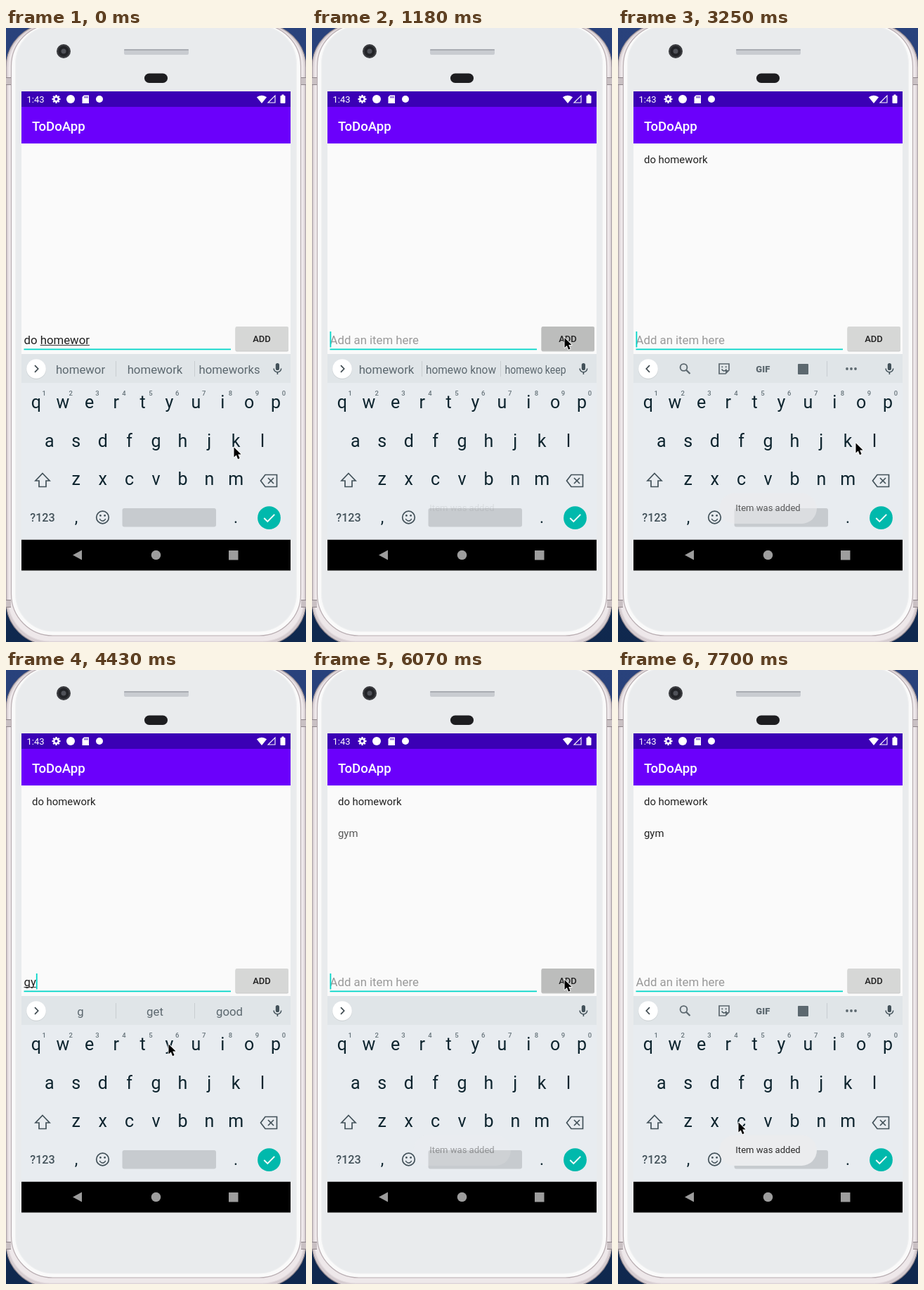
An HTML page with a canvas that plays this animation: 427x872 px, repeating every 8000 ms.

```html
<!DOCTYPE html>
<html lang="en">
<head>
<meta charset="utf-8">
<title>To-do list on a phone</title>
<style>
html, body { margin: 0; width: 100%; height: 100%; overflow: hidden; background: #0e1c3c; }
canvas { display: block; width: 427px; height: 872px; }
</style>
</head>
<body>
<canvas id="stage"></canvas>
<script>
const W = 427, H = 872, MID = 213.5, LOOP = 8000;
const STEP = 147.5, LAST = 52; // screen refresh in ms, last refresh of the loop
const canvas = document.getElementById('stage');
const c = canvas.getContext('2d');
const dpr = window.devicePixelRatio || 1;
canvas.width = W * dpr;
canvas.height = H * dpr;

const TEAL = '#00d5c8', GREY = '#5c686f', DARK = '#43525a', INK = '#0d242e';
const PURPLE = '#3b00b5', NAV = '#9d9d9d';

// Places the pointer visits
const STOPS = [
  { at: 0, hold: 2, x: 324, y: 595 },
  { at: 4, hold: 1, x: 348, y: 429 },
  { at: 7, hold: 2, x: 359, y: 439.5 },
  { at: 13, hold: 3, x: 246, y: 585 },
  { at: 20, hold: 3, x: 338, y: 589 },
  { at: 27, hold: 1, x: 212, y: 587 },
  { at: 29.5, hold: 2, x: 231, y: 531 },
  { at: 35, hold: 1, x: 324, y: 641 },
  { at: 39, hold: 3, x: 359, y: 439.5 },
  { at: 51, hold: 2, x: 171, y: 642 }
];
// What the field holds from a given moment, with the words offered for it
const EDITS = [
  { at: -4, typed: 'do homewor', hints: ['homewor', 'homework', 'homeworks'] },
  { at: 2, typed: 'do homework', hints: ['homework', 'homewo know', 'homewo keep'] },
  { at: 7.9, typed: '', hints: [] },
  { at: 28, typed: 'g', hints: ['g', 'get', 'good'] },
  { at: 30, typed: 'gy', hints: ['gy', 'gym', 'guy'] },
  { at: 36, typed: 'gym', hints: ['gym', 'gyms', 'gymnastics'] },
  { at: 40.5, typed: '', hints: [] }
];
// Clearing the field means its text was added to the list
const ADDS = EDITS
  .map((e, i) => ({ ...e, item: i ? EDITS[i - 1].typed : '' }))
  .filter(e => !e.typed);

const latest = n => EDITS.filter(e => e.at <= n).pop();
const clamp = v => Math.max(0, Math.min(1, v));
const smooth = k => k * k * (3 - 2 * k);

function box(x, y, w, h, color, r = 0) {
  c.beginPath();
  c.roundRect(x, y, w, h, r);
  c.fillStyle = color;
  c.fill();
}

function line(color, width) {
  c.strokeStyle = color;
  c.lineWidth = width;
  c.stroke();
}

function arc(x, y, r, from = 0, to = Math.PI * 2) {
  c.beginPath();
  c.arc(x, y, r, from, to);
}

function disc(x, y, r, color) {
  arc(x, y, r);
  c.fillStyle = color;
  c.fill();
}

function smile(x, y, r) {
  arc(x, y, r, 0.3, Math.PI - 0.3);
  line(DARK, 1.5);
}

function poly(points, closed = true) {
  c.beginPath();
  for (let i = 0; i < points.length; i += 2) c.lineTo(points[i], points[i + 1]);
  if (closed) c.closePath();
}

function shape(points, color) {
  poly(points);
  c.fillStyle = color;
  c.fill();
}

function text(s, x, y, size, color, { weight = 400, align = 'left', max } = {}) {
  c.font = `${weight} ${size}px Roboto, sans-serif`;
  c.textAlign = align;
  c.fillStyle = color;
  c.fillText(s, x, y, max);
}

function shell(x, top, bottom, r, fill, edge) {
  box(x, top, W - 2 * x, bottom - top, fill, r);
  line(edge, 1.2);
}

function drawPhone() {
  const night = c.createLinearGradient(0, 0, 0, H);
  night.addColorStop(0, '#29427c');
  night.addColorStop(1, '#0f284e');
  box(0, 0, W, H, night);

  shell(0, -6, 876, 62, '#d5ccd0', '#958b90');
  shell(3, -4, 871, 60, '#eee8ea', '#e4dcdf');
  shell(7.5, -5, 863, 59, '#fafafa', '#b9aeb2');
  shell(13.5, -3, 857, 54, '#e9ebed', '#eff0f1');
  for (const x of [0, 420]) {
    for (const y of [70, 812]) {
      box(x, y, 7, 11, '#8f868a');
      box(x, y + 1, 7, 9, '#c9c0c3');
    }
  }

  disc(82, 33, 10, '#3a3b3f');
  disc(82, 33, 7.5, '#222327');
  disc(82, 33, 3.5, '#505259');
  box(168, 30, 92, 8, '#c9ccd1', 2);
  box(168, 30, 92, 2, '#a9acb2', 1);
  box(197, 64.5, 33, 13.5, '#1d1d20', 6.75);
}

function drawStatus() {
  text('1:43', 29.5, 106, 13, '#fff');
  for (let a = 0; a < Math.PI; a += Math.PI / 4) {
    const dx = 6 * Math.cos(a), dy = 6 * Math.sin(a);
    poly([71.5 - dx, 101 - dy, 71.5 + dx, 101 + dy], false);
    line('#fff', 2.4);
  }
  disc(71.5, 101, 4.4, '#fff');
  disc(71.5, 101, 2, PURPLE);
  disc(92, 101, 6, '#fff');
  shape([111, 95.5, 118, 95.5, 118, 107, 108.5, 107, 108.5, 98], '#fff');
  for (const x of [111.5, 113.5, 115.5]) box(x, 97, 1, 2.5, PURPLE);
  disc(133, 101, 5, '#fff');

  arc(364, 107, 11.2, -Math.PI * 0.72, -Math.PI * 0.28);
  c.lineTo(364, 107);
  c.fillStyle = '#fff';
  c.fill();
  poly([383, 96, 383, 106, 373, 106]);
  line('#fff', 1.1);
  box(390.5, 96, 7, 11, '#fff', 1);
  box(392.5, 94.5, 3, 2, '#fff');
}

function drawBars() {
  box(22, 90, 383, 680.5, '#fafafa');
  box(22, 90, 383, 22, PURPLE);
  box(22, 112, 383, 52, '#6b00fb');
  text('ToDoApp', 37, 145.5, 18.64, '#fff', { weight: 500 });
  drawStatus();

  box(22, 726.5, 383, 44, '#000');
  shape([95, 748.5, 108, 741.5, 108, 755.5], NAV);
  disc(MID, 748.5, 6.8, NAV);
  box(317, 742, 13.5, 13.5, NAV);
}

function drawList(n) {
  ADDS.forEach(({ at, item }, i) => {
    c.globalAlpha = clamp((n - at - 0.2) / 0.4);
    text(item, 37, 192 + i * 44.7, 14.9, '#212121');
  });
  c.globalAlpha = 1;
}

function drawInput(n) {
  const { at, typed } = latest(n), x = 25.5;
  text(typed || 'Add an item here', x, 448.5, 16.78, typed ? '#212121' : '#999');
  const edge = s => x + c.measureText(s).width;
  const end = edge(typed), word = edge(typed.slice(0, typed.lastIndexOf(' ') + 1));
  box(word, 450, end - word, 1, '#333');
  box(x, 455.5, 294.5, 1.8, TEAL);
  if ((n - at) * STEP % 1000 < 500) box(end, 431, 1.8, 22.5, TEAL);

  const down = ADDS.some(e => Math.abs(n - e.at) < 1.6);
  box(326.5, 425, 75.5, 34.5, '#c9caca', 2);
  box(326.5, 424, 75.5, 34.5, down ? '#bcbdbc' : '#d6d7d6', 2);
  text('ADD', 364, 446, 13.05, '#212121', { weight: 500, align: 'center' });
}

function drawMic() {
  box(383.8, 476, 5.2, 10, DARK, 2.6);
  arc(386.4, 483.5, 5.3, 0, Math.PI);
  line(DARK, 1.5);
  box(385.6, 489, 1.6, 3, DARK);
}

function drawIcons() {
  arc(93.5, 482, 4.9);
  line(GREY, 1.9);
  poly([97, 485.6, 102.5, 491], false);
  line(GREY, 2.2);

  poly([144, 477, 158, 477, 158, 486, 153, 491, 144, 491]);
  line(GREY, 1.7);
  shape([153, 491, 153, 486, 158, 486], GREY);
  for (const x of [148.3, 153.7]) disc(x, 481.3, 1.1, GREY);
  smile(151, 483.5, 3.4);

  text('GIF', 206.3, 488.7, 13, GREY, { weight: 900, align: 'center' });
  box(256, 477, 15, 15, GREY, 1);
  box(297, 473, 1, 22, '#c8cdd1');
  for (const x of [326, 332, 338]) disc(x, 484, 1.9, GREY);
}

function drawStrip(n) {
  const { at, hints } = latest(n - 0.5);
  const icons = !hints.length && n - at > 2;
  box(22, 463, 383, 41.5, '#e0e5e8');
  disc(43, 484.8, 14.2, '#d0d5d8');
  disc(43, 484, 13.8, '#fff');
  const d = icons ? -1 : 1;
  poly([43 - 2 * d, 479.2, 43 + 2.7 * d, 484, 43 - 2 * d, 488.8], false);
  line('#3f4a50', 1.7);
  drawMic();
  if (icons) drawIcons();
  hints.forEach((s, i) => {
    const max = i === 1 ? 100 : 87;
    text(s, 106 + i * 106, 490.5, 16.78, GREY, { align: 'center', max });
    if (i) box(44 + i * 112, 473, 1, 22, '#c8cdd1');
  });
}

function drawKeys() {
  box(22, 504, 383, 222.5, '#e8ecf0');
  ['qwertyuiop', 'asdfghjkl', 'zxcvbnm'].forEach((row, r) => {
    [...row].forEach((key, i) => {
      const x = MID + (i - (row.length - 1) / 2) * 37.9;
      text(key, x, 540 + r * 54.7, 25, INK, { align: 'center' });
      if (!r) text((i + 1) % 10, x + 11.3, 521.5, 9.5, '#66737a', { weight: 500, align: 'center' });
    });
  });

  poly([52, 632.5, 62, 643, 57, 643, 57, 651.5, 47, 651.5, 47, 643, 42, 643]);
  line(DARK, 1.7);
  poly([362.5, 643, 369, 634.5, 385.5, 634.5, 385.5, 651.5, 369, 651.5]);
  line(DARK, 1.7);
  for (const d of [-4, 4]) {
    poly([373, 643 - d, 381, 643 + d], false);
    line(DARK, 1.7);
  }

  text('?123', 52, 701, 16.2, DARK, { weight: 500, align: 'center' });
  text(',', 100, 703, 23, INK, { align: 'center' });
  text('.', 327, 703, 23, INK, { align: 'center' });

  arc(137.5, 695, 8.8);
  line(DARK, 1.7);
  for (const x of [134.4, 140.6]) disc(x, 692.4, 1.4, DARK);
  smile(137.5, 695.6, 4.4);

  box(165.5, 682, 133.5, 26.5, '#c7cbcf', 3);
  disc(374.5, 695.7, 16.4, '#00b9ac');
  poly([367.3, 696, 372.3, 701, 382.2, 690.8], false);
  line('#fff', 1.9);
}

function drawToast(n) {
  for (const { at } of ADDS) {
    const age = n - at;
    const shown = Math.min(clamp(age / 1.2), clamp((17.1 - age) / 4));
    c.globalAlpha = shown ** 2;
    box(144, 660.5, 139, 43.5, '#ebecee', 21.7);
    c.globalAlpha = shown;
    text('Item was added', MID, 686.3, 13.05, '#2b2b2b', { align: 'center' });
  }
  c.globalAlpha = 1;
}

function drawPointer(n) {
  const i = STOPS.findLastIndex(s => s.at <= n);
  const a = STOPS[i], b = STOPS[i + 1] || a;
  const k = smooth(clamp((n - a.at - a.hold) / (b.at - a.at - a.hold)));
  c.save();
  c.translate(a.x + (b.x - a.x) * k, a.y + (b.y - a.y) * k);
  poly([0.5, 0.5, 0.5, 14.5, 3.8, 11.6, 6.1, 17.2, 8.6, 16.1, 6.2, 10.6, 10.6, 10.6]);
  c.lineJoin = 'round';
  line('#fff', 1.8);
  c.fillStyle = '#000';
  c.fill();
  c.restore();
}

function draw(now) {
  const n = Math.min(LAST, Math.floor((now % LOOP) / STEP));
  c.setTransform(dpr, 0, 0, dpr, 0, 0);
  drawPhone();
  drawBars();
  drawList(n);
  drawInput(n);
  drawStrip(n);
  drawKeys();
  drawToast(n);
  drawPointer(n);
}

const begin = performance.now();
function tick() {
  draw(performance.now() - begin);
  requestAnimationFrame(tick);
}
tick();
</script>
</body>
</html>
```
